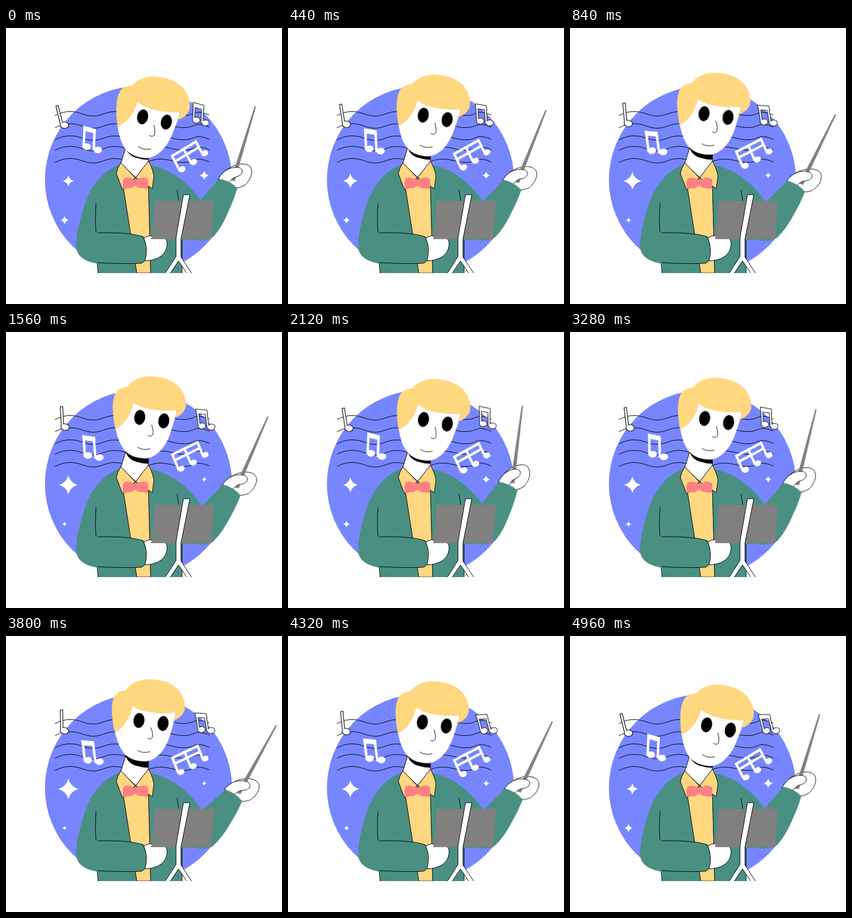
Write an HTML page that moves like this. It is 500 px wide and 500 px high and loops after 5040 ms.

```html
<!DOCTYPE html>
<html lang="en">
<head>
<meta charset="utf-8">
<title>Conductor</title>
<style>
html, body { margin: 0; width: 100%; height: 100%; overflow: hidden; background: #fff; }
svg { display: block; width: 100%; height: 100%; }
.line { fill: none; stroke: #000; stroke-width: 1; stroke-linecap: round; stroke-linejoin: round; }
.coat { fill: #499083; }
.gold { fill: #ffd77f; }
.white { fill: #fff; }
.edge { stroke: #000; stroke-width: 1; stroke-linejoin: round; }

/* musical notes: --w is the stem width, --h the extra rim of the heads */
.note { color: #fff; --w: 4.4px; --h: 0px; }
.thin { --w: 3.2px; }
.rim { color: #000; --w: 5.6px; --h: 2.4px; }
.stem { fill: none; stroke: currentColor; stroke-width: var(--w); stroke-linecap: square; }
.dot { fill: currentColor; stroke: currentColor; stroke-width: var(--h); }

.move { animation: 5040ms linear infinite; }
.arm { animation-name: arm; transform-origin: 350px 365px; }
.hand { animation-name: hand; transform-origin: 408px 278px; }
.head { animation-name: head; transform-origin: 235px 232px; }
.open { animation-name: open; }
.shut { animation-name: shut; }
.big { animation-name: big; transform-origin: 113px 277px; }
.right { animation-name: small; transform-origin: 359px 267px; }
.low { animation-name: small; transform-origin: 106px 348px; }
.quarter { animation-name: quarter; transform-origin: 97px 160px; }
.pair { animation-name: pair; transform-origin: 154px 200px; }
.triple { animation-name: triple; transform-origin: 333px 228px; }
.outer { animation-name: outer; }

@keyframes arm {
  0%, 98.6%, 100% { transform: rotate(0deg); }
  25.8%, 77% { transform: rotate(8.2deg); }
  51.2% { transform: rotate(-8.6deg); }
}
@keyframes hand {
  0%, 98.6%, 100% { transform: rotate(0deg); }
  25.8%, 77% { transform: rotate(6.2deg); }
  51.2% { transform: rotate(-14.4deg); }
}
@keyframes head {
  0%, 51.2%, 98.6%, 100% { transform: translateY(0) rotate(0deg); }
  24.8%, 76.6% { transform: translateY(-7.5px) rotate(-5.6deg); }
  47.6%, 54.8% { transform: translateY(-.5px) rotate(-.4deg); }
}
@keyframes open {
  0%, 47.6% { opacity: 1; animation-timing-function: step-end; }
  47.61%, 59.5% { opacity: 0; animation-timing-function: step-end; }
  59.51%, 100% { opacity: 1; }
}
@keyframes shut {
  0%, 47.6% { opacity: 0; animation-timing-function: step-end; }
  47.61%, 59.5% { opacity: 1; animation-timing-function: step-end; }
  59.51%, 100% { opacity: 0; }
}
@keyframes big {
  0%, 51.2%, 98.6%, 100% { transform: scale(1); }
  25.8%, 77% { transform: scale(1.95); }
}
@keyframes small {
  0%, 51.2%, 98.6%, 100% { transform: scale(1); }
  25.8%, 77% { transform: scale(.46); }
}
@keyframes quarter {
  0%, 98.6%, 100% { transform: translate(0, 0) rotate(0deg); }
  25.8% { transform: translate(3.6px, -6.5px) rotate(14deg); }
  51.2% { transform: translate(7.2px, 0) rotate(0deg); }
  77% { transform: translate(3.4px, -6.5px) rotate(14deg); }
}
@keyframes pair {
  0%, 98.6%, 100% { transform: translate(0, 0) rotate(0deg); }
  19.8% { transform: translate(-1.3px, 7.4px) rotate(-12.5deg); }
  25.8% { transform: translate(-1px, 9.5px) rotate(-9.6deg); }
  51.2% { transform: translate(6.2px, 2px) rotate(4.5deg); }
  77% { transform: translate(-.8px, 9.5px) rotate(-10.6deg); }
  82.3% { transform: translate(-.8px, 7.6px) rotate(-12.5deg); }
}
@keyframes triple {
  0%, 98.6%, 100% { transform: translate(0, 0) rotate(0deg); }
  25.8%, 77% { transform: translate(.8px, -8.2px) rotate(6.4deg); }
  51.2% { transform: translate(.5px, -2.4px) rotate(0deg); }
}
@keyframes outer {
  0% { transform: translate(351px, 154.5px) rotate(0deg); }
  16.7% { transform: translate(355.5px, 157px) rotate(-11deg); }
  31% { transform: translate(359px, 157px) rotate(-10deg); }
  51.2% { transform: translate(359.5px, 150.5px) rotate(2deg); }
  65% { transform: translate(358.5px, 154.5px) rotate(-5deg); }
  85.7% { transform: translate(357.5px, 158px) rotate(-18deg); }
  100% { transform: translate(358.5px, 158px) rotate(-17deg); }
}
</style>
</head>
<body>
<svg viewBox="0 0 500 500">
  <defs>
    <clipPath id="floor"><rect width="500" height="444"/></clipPath>
    <path id="star" d="M0-10Q2-2 10 0Q2 2 0 10Q-2 2-10 0Q-2-2 0-10Z" fill="#fff"/>
    <path id="wave" class="line" d="M89 7Q104-1 118 0C134 0 142 8 158 8S180 0 197 0S222 8 239 8S264 1 280 1S306 7 322 7S340 1 350 1Q360 2 368 6"/>
    <g id="quarter">
      <path class="stem" d="M93 143L101.5 177"/>
      <ellipse class="dot" cx="106" cy="176" rx="7" ry="5.4"/>
    </g>
    <g id="pair">
      <path class="stem" d="M-11.5-20L-13.5 14M6.5-15L5 20"/>
      <path class="dot" d="M-14-23L8.5-17V-8.5L-14-14Z"/>
      <ellipse class="dot" cx="-7.5" cy="15" rx="7.5" ry="6"/>
      <ellipse class="dot" cx="12.500" cy="21" rx="7.500" ry="6"/>
    </g>
    <g id="triple">
      <path class="stem" d="M301 232L314 257M322 219.500L335 244M344 206L356 228M301 232L344 206M306 242L349 216"/>
      <ellipse class="dot" cx="319" cy="256" rx="6.500" ry="5.200" transform="rotate(-28 319 256)"/>
      <ellipse class="dot" cx="340" cy="243" rx="6.500" ry="5.200" transform="rotate(-28 340 243)"/>
      <ellipse class="dot" cx="360" cy="227" rx="6.500" ry="5.200" transform="rotate(-28 360 227)"/>
    </g>
  </defs>

  <g clip-path="url(#floor)">
    <circle cx="240" cy="275" r="169.500" fill="#7786ff"/>
    <use href="#wave" y="151.500"/>
    <use href="#wave" y="173.500"/>
    <use href="#wave" y="195.500"/>
    <use href="#wave" y="214.500"/>
    <use href="#wave" y="236.500"/>

    <g class="move big"><use href="#star" x="113" y="277"/></g>
    <g class="move right"><use href="#star" transform="translate(359 267) scale(.84)"/></g>
    <g class="move low"><use href="#star" transform="translate(106 348) scale(.75)"/></g>

    <g class="move quarter">
      <use href="#quarter" class="note rim"/>
      <use href="#quarter" class="note thin"/>
    </g>
    <g class="move pair"><use href="#pair" class="note" x="154" y="200"/></g>
    <g class="move triple"><use href="#triple" class="note"/></g>
    <g class="move outer">
      <g transform="scale(.83)">
        <use href="#pair" class="note rim"/>
        <use href="#pair" class="note thin"/>
      </g>
    </g>

    <!-- jacket -->
    <path class="coat" d="M207 247C176 258 155 284 143 318C133 350 126 378 127 398C130 416 145 423 166 427V444H319V384H352V312C334 285 302 257 262 248Z"/>
    <path class="line" d="M165 427L167 444M163 318Q161 345 163 370M310 294L313 313M319 384V444"/>
    <path class="gold edge" d="M212 285L237 444H262L258 285Z"/>

    <!-- neck and collar -->
    <path class="white edge" d="M217 217L208 245L235 271L258 242V215Z"/>
    <path d="M216 216Q222 233 240 236Q249 239 258 238.500V214Z"/>
    <path class="gold edge" d="M208 244Q201 255 200 264L211 293L234 271Z"/>
    <path class="gold edge" d="M258 241Q267 258 268 269L265 291L235 271Z"/>
    <path fill="#ff8083" d="M234 275C226 272 219 269 213 273C210 279 212 286 211 291C217 294 219 289 223 290C227 292 230 287 234 286C238 287 242 292 246 290C250 289 252 294 258 290C256 285 260 278 256 273C249 269 242 272 234 275Z"/>

    <!-- raised arm -->
    <g class="move arm">
      <g class="move hand">
        <path class="white edge" d="M384 275C389 266 395 259 404 254C416 246 434 243 442 251C449 260 443 276 432 285Q424 290 414 290Z"/>
        <path d="M450.500 141.500L453 142L414.500 277.500L407 276Z" fill="#808080"/>
        <path class="white edge" d="M384 275C389 265 397 257 407 254C417 251 427 252 428 258C429 264 424 268 416 270C408 272 408 277 402 281Z"/>
      </g>
      <path class="coat" d="M330 336L350 315L386 273Q405 276 419 290Q413 311 404 330Q392 360 376 378Q361 388 342 384L318 360Z"/>
    </g>

    <!-- lowered arm -->
    <path class="white edge" d="M250 380Q260 374 272 378L287 380Q295 387 290 401Q283 420 252 422Z"/>
    <path class="coat" d="M150 371L200 372Q232 373 249 378Q256 392 254 410Q253 423 246 426Q220 428 166 425L140 415Z"/>
    <path class="line" d="M166 371Q225 370 248 378Q256 392 254 410Q253 423 246 426Q220 428 166 425"/>

    <!-- music stand -->
    <path d="M270 313H377L371.500 382.500H263Z" fill="#808080"/>
    <path class="white edge" d="M321.500 302H333L317 382V415L337 445H328L312.500 422L297 445H288L308 414V380Z"/>

    <!-- head -->
    <g class="move head">
      <path class="white" d="M201 160C202 184 206 206 217 220Q228 234 254 236C276 235 293 213 301 193C307 177 312 167 316 150L240 115Z"/>
      <path class="gold" d="M202 179C199 156 198 128 207 114Q214 104 229 104C239 92 254 88 267 88C296 89 321 101 329 122Q335 135 332 149Q326 163 308 167Q314 160 316 153C286 153 254 148 238 134C233 151 223 170 202 179Z"/>
      <g class="move open">
        <ellipse cx="247.500" cy="161" rx="10" ry="13.500" transform="rotate(12 247.500 161)"/>
        <ellipse cx="290.500" cy="170.500" rx="10" ry="13.500" transform="rotate(12 290.500 170.500)"/>
      </g>
      <g class="move shut">
        <path class="line" style="stroke-width:3.5" d="M239 159Q248 151 257 160M281 170Q291 162 299 172"/>
      </g>
      <path class="line" d="M268 176Q271 187 269 193Q266 199 260 194.500M240 215Q250 222 262 219"/>
    </g>
  </g>
</svg>
</body>
</html>
```
